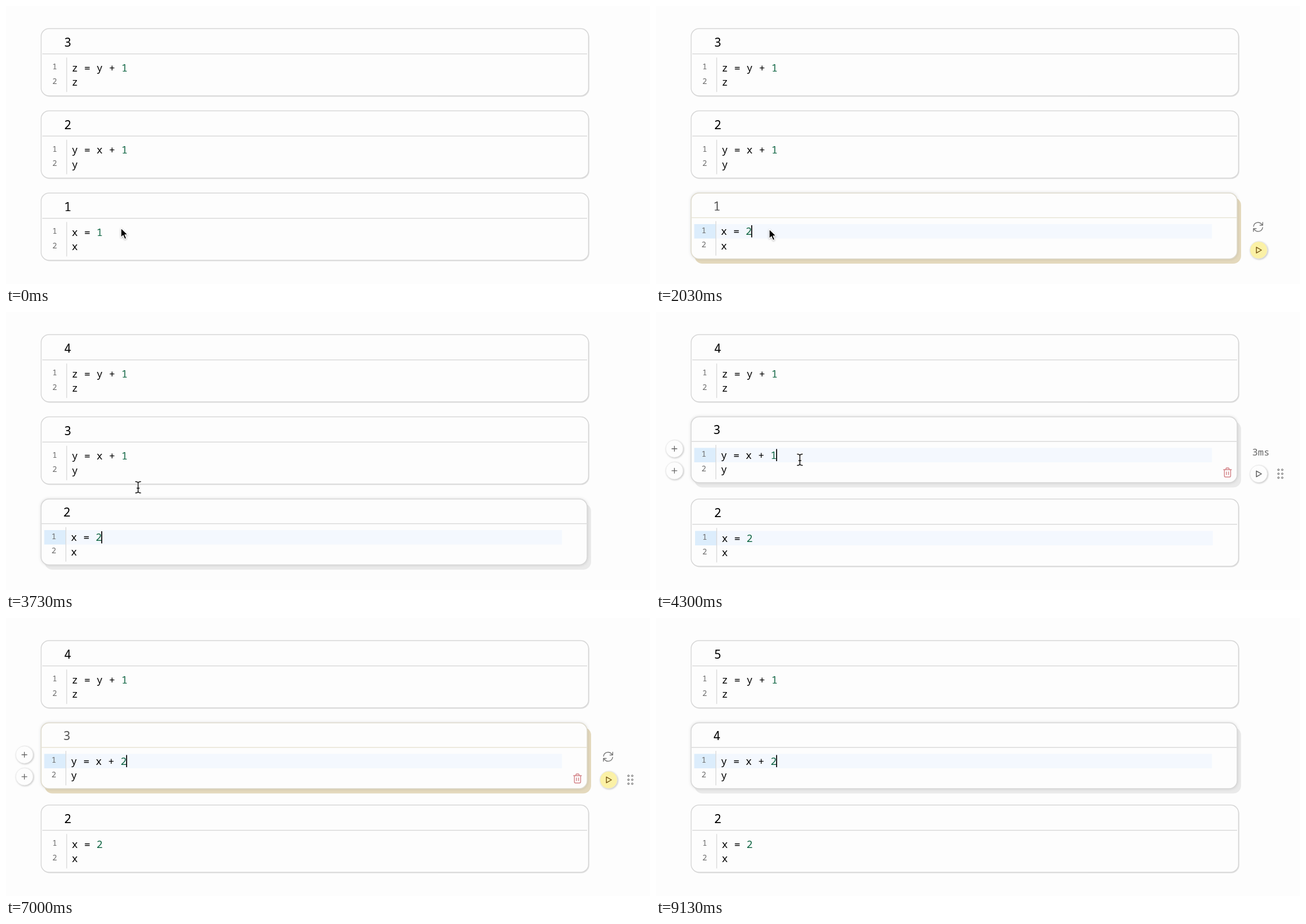
Write an HTML page that moves like this. It is 1137 by 492 pixels and loops after 9.21 s.

```html
<!DOCTYPE html>
<html lang="en">
<head>
<meta charset="utf-8">
<title>Reactive notebook cells</title>
<style>
  html, body { margin: 0; width: 100%; height: 100%; overflow: hidden; background: #fdfdfd; }
  svg { display: block; width: 100%; height: 100%; }
  text { font-family: "Noto Sans Mono", "DejaVu Sans Mono", monospace; white-space: pre; }
  .code { font-size: 18.28px; }
  .out { font-size: 21.5px; text-anchor: middle; }
  .line { font-size: 14px; fill: #6c6c6c; text-anchor: middle; }
  .time { font-size: 17px; fill: #666; }
  .glow { filter: drop-shadow(0 0 2.5px rgba(0, 0, 0, .13)); }
  .round { filter: drop-shadow(1px 1.5px 1.5px rgba(0, 0, 0, .24)); }
  .icon { fill: none; stroke-linecap: round; stroke-linejoin: round; }
</style>
</head>
<body>
<svg id="stage" viewBox="0 0 1137 492"></svg>
<script>
const LOOP = 9210, CHAR = 10.97, LINE = 25.6, BLINK = 600;
const TOPS = [40, 185.5, 331];
const KEYS = [0, 1530, 2030, 4300, 5470, 6430]; // moments that restart the caret
const stage = document.getElementById('stage');

const clamp = v => Math.max(0, Math.min(1, v));
const ramp = (t, from, to) => clamp((t - from) / (to - from));
const ease = p => p * p * (3 - 2 * p);
const lerp = (a, b, p) => a + (b - a) * p;
const mix = (a, b, p) => `rgb(${a.map((v, i) => Math.round(lerp(v, b[i], p)))})`;
const within = (t, from, to) => t >= from && t < to;

const rect = (x, y, w, h, attrs) => `<rect x="${x}" y="${y}" width="${w}" height="${h}" ${attrs}/>`;
const text = (x, y, cls, content, attrs = '') => `<text x="${x}" y="${y}" class="${cls}" ${attrs}>${content}</text>`;
const path = (d, attrs) => `<path d="${d}" ${attrs}/>`;
const group = (x, y, body, attrs = '') => `<g transform="translate(${x} ${y})" ${attrs}>${body}</g>`;

function pointerAt(t) {
  if (t < 3430) {
    const p = ease(ramp(t, 30, 400));
    return { arrow: true, x: lerp(203, 200, p), y: lerp(393, 395, p) };
  }
  return null;
}

function beamAt(t) {
  if (within(t, 3400, 5470)) {
    const p = ease(ramp(t, 3400, 3970));
    return { x: lerp(199.5, 254, p), y: lerp(390, 261.5, p) };
  }
  if (within(t, 8170, 8560)) {
    const p = ease(ramp(t, 8170, 8560));
    return { x: lerp(254, 262, p), y: lerp(261.5, 48, p) };
  }
  return null;
}

function hoveredCell(t) {
  if (within(t, 5470, 8170)) return 1;
  const beam = t >= 3430 && beamAt(t);
  return beam ? TOPS.findIndex(top => beam.y >= top && beam.y <= top + 119) : -1;
}

function cellsAt(t) {
  const focus = t < 30 ? -1 : t < 4300 ? 2 : 1;
  const hover = hoveredCell(t);
  const xDigit = t < 1530 ? '1' : t < 2030 ? '' : '2';
  const yDigit = t < 5470 ? '1' : t < 6430 ? '' : '2';
  const stale = [
    0,
    t < 7000 ? ease(ramp(t, 5470, 5720)) : 1 - ease(ramp(t, 7000, 7150)),
    t < 2830 ? ease(ramp(t, 1530, 1780)) : 1 - ease(ramp(t, 2830, 2980))
  ];
  const cells = [
    { name: 'z', expr: 'z = y + ', digit: '1', out: t < 2930 ? 3 : t < 7100 ? 4 : 5, time: '3ms' },
    { name: 'y', expr: 'y = x + ', digit: yDigit, out: t < 2900 ? 2 : t < 7030 ? 3 : 4, time: t < 7000 ? '3ms' : '2ms' },
    { name: 'x', expr: 'x = ', digit: xDigit, out: t < 2830 ? 1 : 2, time: '2ms' }
  ];
  return cells.map((cell, i) => ({
    ...cell,
    focused: i === focus,
    hovered: i === hover,
    stale: stale[i],
    active: i === focus || (i === 2 && within(t, 4300, 4360))
  }));
}

function caret(cell, t) {
  const since = t - KEYS.filter(k => k <= t).pop();
  if (Math.floor(since / BLINK) % 2) return '';
  const x = 114.3 + (cell.expr + cell.digit).length * CHAR;
  return rect(x - 1, 57, 1.7, 21.5, 'fill="#000"');
}

function frameOf({ focused, stale }) {
  const border = mix([215, 215, 215], [222, 218, 204], stale);
  const rule = mix([216, 216, 216], [230, 227, 211], stale);
  const shadow = mix([234, 234, 234], [228, 217, 189], stale);
  const edge = `rx="14" fill="#fdfdfd" stroke="${border}" stroke-width="1.5"`;
  return focused
    ? rect(68, 8, 965, 117, `rx="14" fill="${shadow}"`) +
      rect(62, 0, 964, 116.5, `${edge} class="glow"`) +
      rect(63, 42.9, 962, 1.4, `fill="${rule}"`)
    : rect(63, 1.5, 967, 119.3, 'rx="14.5" fill="#e4e4e4"') +
      rect(62, 0, 966.5, 119, edge) +
      rect(64, 44, 962, 1.4, `fill="${rule}"`);
}

function bodyOf(cell, t) {
  const { focused, stale } = cell;
  const shift = focused ? 0 : 1.5;
  const active = cell.active
    ? rect(67.5, 55, 38, 25.5, 'fill="#dcedfc"') + rect(105.5, 55, 876, 25.5, 'fill="#f4f8fe"')
    : '';
  const ink = mix([0, 0, 0], [85, 85, 85], stale);
  const content = active +
    rect(105, 49.7, 1.3, 61, 'fill="#d8d8d8"') +
    text(107.4, 30.5, 'out', cell.out, `fill="${ink}"`) +
    text(84.5, 70.7, 'line', 1) +
    text(84.5, 70.7 + LINE, 'line', 2) +
    text(114.5, 74, 'code', `${cell.expr}<tspan fill="#116644">${cell.digit}</tspan>`) +
    text(114.5, 74 + LINE, 'code', cell.name) +
    (focused ? caret(cell, t) : '');
  return group(shift, shift, content);
}

const disc = (x, y, body, fill = '#fdfdfd') =>
  group(x, y, `<circle r="15.3" fill="${fill}" stroke="#e6e6e6" stroke-width=".8" class="round"/>${body}`);

const plus = path('M-4.5 0H4.5M0-4.5V4.5', 'class="icon" stroke="#666" stroke-width="1.3"');

const trash = group(1009, 98.5, path(
  'M-7-5H7M-5.5-5V6Q-5.5 8-3.5 8H3.5Q5.5 8 5.5 6V-5M-2.8-5V-6.5Q-2.8-8-1.3-8H1.3Q2.8-8 2.8-6.5V-5M-1.8-1V4M1.8-1V4',
  'class="icon" stroke="#d27f84" stroke-width="1.4"'));

const refresh = group(1063, 60, path(
  'M-8-1A8 8 0 0 1 6-5.2L8.2-3M8.2-8V-3H3.2M8 1A8 8 0 0 1-6 5.2L-8.2 3M-8.2 8V3H-3.2',
  'class="icon" stroke="#757575" stroke-width="1.4"'));

const grip = [0, 1, 2].map(row => [1099, 1105.7].map(x =>
  `<circle cx="${x}" cy="${93.8 + row * 7}" r="1.5" fill="#ddd" stroke="#666" stroke-width="1"/>`).join('')).join('');

function controlsOf({ hovered, stale, time }) {
  let body = '';
  if (hovered) body += disc(32.5, 56.5, plus) + disc(32.5, 95.3, plus) + trash + grip;
  if (hovered || stale) {
    const play = path('M-4-5.2L5 0L-4 5.2Z',
      `class="icon" stroke="${mix([85, 85, 85], [115, 82, 18], stale)}" stroke-width="1.4"`);
    const run = disc(1064, 101, play, mix([253, 253, 253], [251, 241, 166], stale));
    body += hovered ? run : `<g opacity="${stale}">${run}</g>`;
  }
  if (stale) body += `<g opacity="${stale}">${refresh}</g>`;
  if (hovered && stale < .5) body += text(1052.5, 68.3, 'time', time);
  return body;
}

const arrow = ({ x, y }) => group(x, y, path(
  'M0 0V16.6L3.8 13L6.6 19.6L9.6 18.3L6.9 11.9H12Z',
  'fill="#000" stroke="#fff" stroke-width="1.2" stroke-linejoin="round"'),
  'style="filter:drop-shadow(0 1.5px 1.5px rgba(0,0,0,.3))"');

const beam = ({ x, y }) => {
  const d = 'M-4.5-10Q0-10 0-7Q0-10 4.5-10M0-7V7M-4.5 10Q0 10 0 7Q0 10 4.5 10M-2 1.5H2';
  return group(x, y, path(d, 'class="icon" stroke="#fff" stroke-width="3"') +
    path(d, 'class="icon" stroke="#111" stroke-width="1.5"'));
};

let shown = '';
function draw(t) {
  let picture = cellsAt(t).map((cell, i) =>
    group(0, TOPS[i], frameOf(cell) + bodyOf(cell, t) + controlsOf(cell))).join('');
  const bar = beamAt(t), pointer = pointerAt(t);
  if (pointer) picture += arrow(pointer);
  if (bar) picture += beam(bar);
  if (picture !== shown) stage.innerHTML = shown = picture;
}

const start = performance.now();
function tick() {
  draw((performance.now() - start) % LOOP);
  requestAnimationFrame(tick);
}
tick();
</script>
</body>
</html>
```
